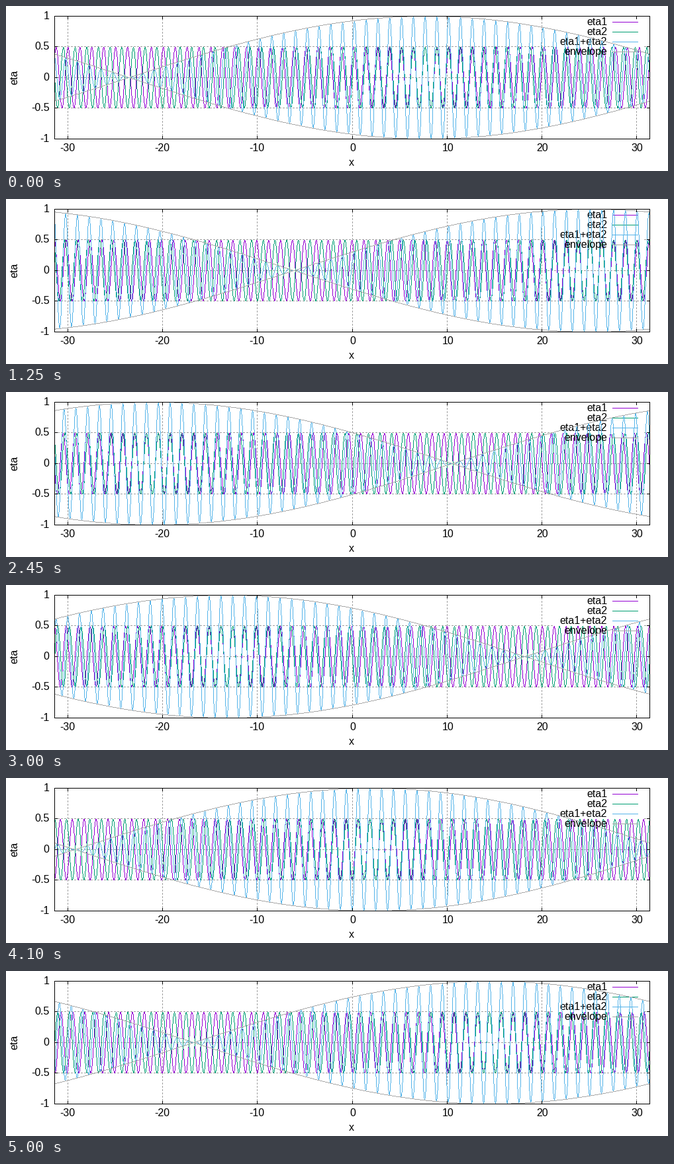
A matplotlib script that plays this animation: 1000 px wide and 250 px high, repeating every 5050 ms.

```python
import numpy as np
import matplotlib.pyplot as plt
from matplotlib.animation import FuncAnimation

W, H = 1000, 250
# Pixel centres of the plot frame
LEFT, RIGHT, TOP, BOTTOM = 73.5, 972.5, 15.5, 201.5
FRAMES, INTERVAL = 101, 50

PURPLE, GREEN, BLUE, GRAY = "#9400d3", "#009e73", "#56b4e9", "#a8a8a8"
GRID = "#a0a0a0"

# Two deep-water waves with neighbouring wave numbers
AMP, G = 0.5, 9.8
K1, K2 = 5.0, 5.1
W1, W2 = np.sqrt(G * K1), np.sqrt(G * K2)
PHASE = np.pi / 4
X_MAX = 10 * np.pi

cols = np.arange(LEFT, RIGHT + 1)
xs = np.linspace(-X_MAX, X_MAX, len(cols))

plt.rcParams["font.family"] = "Liberation Sans"
plt.rcParams["font.size"] = 16
plt.rcParams["path.simplify"] = False

fig = plt.figure(figsize=(W / 72, H / 72), dpi=72, facecolor="white")
ax = fig.add_axes([0, 0, 1, 1])
ax.set_xlim(0, W)
ax.set_ylim(H, 0)
ax.axis("off")


def px(x):
    """Pixel centre of a data x."""
    return np.floor(LEFT + (x + X_MAX) / (2 * X_MAX) * (RIGHT - LEFT)) + 0.5


def py(y):
    """Pixel centre of a data y."""
    return np.ceil(TOP + (1 - y) / 2 * (BOTTOM - TOP)) - 0.5


def stroke(x, y, color, z, **kw):
    """Hard-edged line one pixel wide."""
    return ax.plot(x, y, color=color, lw=0.5, aa=False, snap=False, zorder=z,
                   solid_capstyle="butt", **kw)[0]


def label(x, y, text, ha="center", z=1):
    ax.text(x, y, text, ha=ha, va="baseline", color="black", zorder=z)


def dotted(x, y):
    # dash lengths scale with the line width
    stroke(x, y, GRID, 0, dashes=(4, 4), dash_capstyle="butt")


def column_runs(y):
    """Vertical run of pixels in each column, meeting halfway to the next."""
    y = py(y)
    before, after = np.r_[y[0], y[:-1]], np.r_[y[1:], y[-1]]
    start = (before + y) / 2
    # the middle row belongs to the later column only
    end = (y + after) / 2 - 0.6 * np.sign(after - y)
    low = np.minimum(np.minimum(start, end), y - 0.25)
    high = np.maximum(np.maximum(start, end), y + 0.25)
    gap = np.full_like(y, np.nan)
    return np.repeat(cols, 3), np.c_[low, high, gap].ravel()


# Grid lines leave the key area free
KEY_LEFT, KEY_RIGHT, KEY_BOTTOM = 827, 964, 77

for v in range(-30, 31, 10):
    x = px(v)
    start = KEY_BOTTOM if KEY_LEFT < x < KEY_RIGHT else TOP
    dotted([x, x], [BOTTOM, start])
    stroke([x, x], [BOTTOM, BOTTOM - 4.5], "black", 20)
    stroke([x, x], [TOP, TOP + 4.5], "black", 20)
    label(x + np.sign(v), 220, str(v))

for v in (-1, -0.5, 0, 0.5, 1):
    y = py(v)
    if abs(v) < 1:
        if y < KEY_BOTTOM:
            dotted([LEFT, KEY_LEFT], [y, y])
            dotted([KEY_RIGHT, RIGHT], [y, y])
        else:
            dotted([LEFT, RIGHT], [y, y])
    stroke([LEFT, LEFT + 4.5], [y, y], "black", 20)
    stroke([RIGHT, RIGHT - 4.5], [y, y], "black", 20)
    label(65.5, y + 4.5, f"{v:g}", ha="right")

stroke([LEFT, RIGHT, RIGHT, LEFT, LEFT], [TOP, TOP, BOTTOM, BOTTOM, TOP],
       "black", 20)
label(522, 242, "x")
ax.text(17, 107.5, "eta", rotation=90, ha="center", va="baseline",
        rotation_mode="anchor")

# Each key entry lies under its own curve and over the earlier ones
curves = []
entries = [("eta1", PURPLE), ("eta2", GREEN), ("eta1+eta2", BLUE),
           ("envelope", GRAY)]
for i, (name, color) in enumerate(entries):
    z = 2 + 3 * i
    y = 24.5 + 15 * i
    label(908, y + 4.5, name, ha="right", z=z)
    stroke([916, 955], [y, y], color, z)
    curves.append(stroke([], [], color, z + 1))
curves.append(stroke([], [], GRAY, 13))


def update(t):
    eta1 = AMP * np.sin(K1 * xs - W1 * t + PHASE)
    eta2 = AMP * np.sin(K2 * xs - W2 * t)
    env = 2 * AMP * np.cos(((K2 - K1) * xs - (W2 - W1) * t - PHASE) / 2)
    for curve, y in zip(curves, (eta1, eta2, eta1 + eta2, env, -env)):
        curve.set_data(*column_runs(y))
    return curves


anim = FuncAnimation(fig, update, frames=FRAMES, interval=INTERVAL,
                     init_func=lambda: update(0), repeat=True, repeat_delay=0)
plt.show()
```
